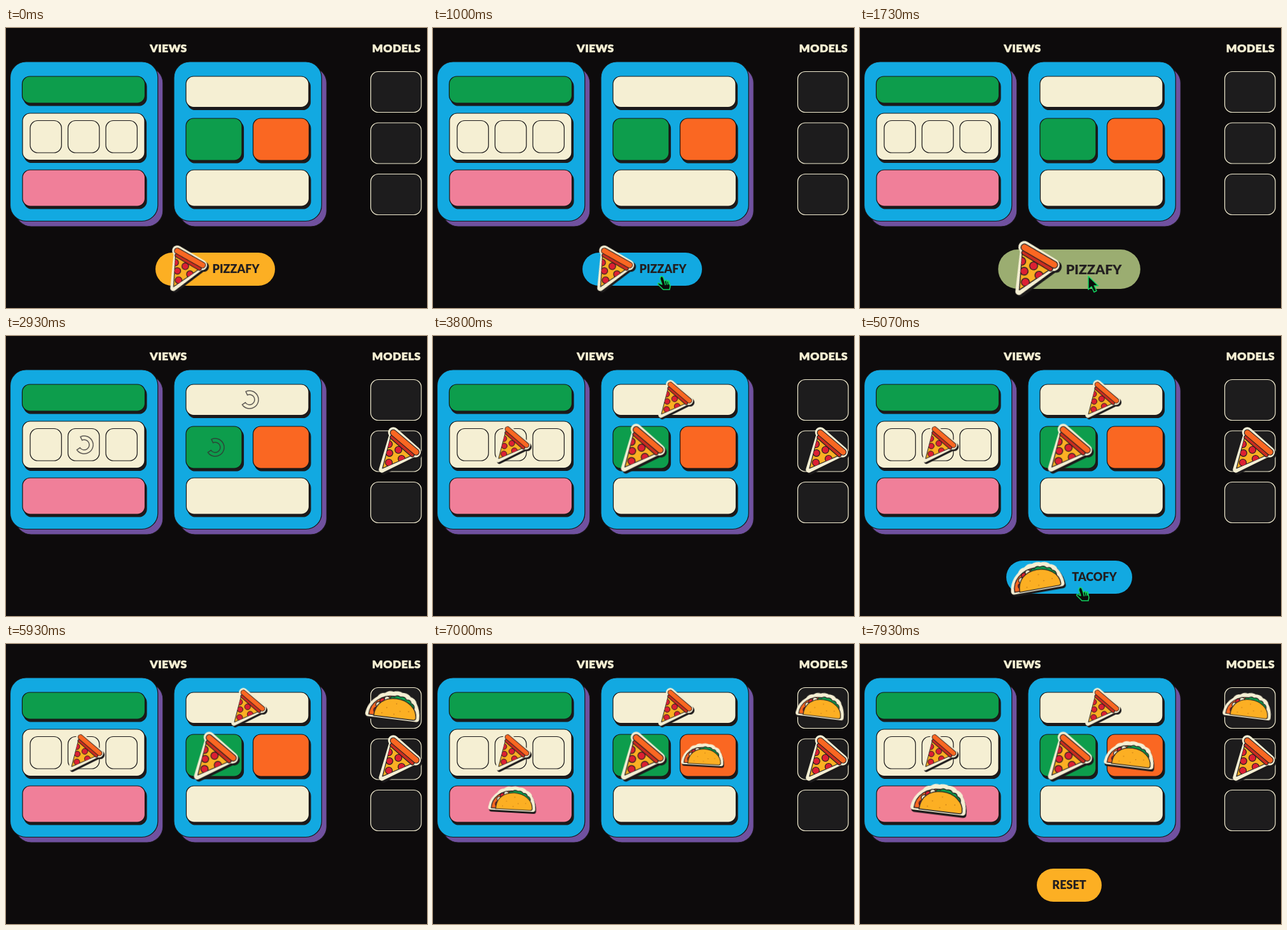
Write an HTML page that moves like this. It is 662x440 px and loops after 8000 ms.

```html
<!DOCTYPE html>
<html lang="en">
<head>
<meta charset="utf-8">
<title>Views and models</title>
<style>
  html, body { margin: 0; width: 100%; height: 100%; overflow: hidden; background: #0d0b0c; }
  svg { display: block; width: 662px; height: 440px; }
  text { font: 900 18px Lato, "Open Sans", sans-serif; text-anchor: middle; }
  .title { font-size: 17.5px; letter-spacing: .5px; fill: #f5efd3; stroke: #f5efd3; stroke-width: .7; }
  .line { fill: none; stroke-linecap: round; stroke-linejoin: round; }
  .ink { stroke: #231f20; stroke-width: 1.2; }
</style>
</head>
<body>
<svg viewBox="0 0 662 440">
  <defs>
    <clipPath id="slice"><path d="M-27 28L-14-22L20 7.5Z"/></clipPath>
    <g id="pizzaEdge">
      <path d="M-28 30L-11-27L25 4Z" stroke-width="9.5" stroke-linejoin="round"/>
      <path d="M-10-28.5L25 2.5" stroke-width="16.5" stroke-linecap="round"/>
    </g>
    <g id="pizza">
      <use href="#pizzaEdge" x="2.5" y="3" fill="#1c1a1b" stroke="#1c1a1b"/>
      <use href="#pizzaEdge" fill="#f5efd3" stroke="#f5efd3"/>
      <path class="ink" d="M-27 28L-14-22L20 7.5Z" fill="#fcaf23" stroke-linejoin="round"/>
      <g class="ink" fill="#dc2033" clip-path="url(#slice)">
        <circle cx="-17" cy="-10" r="5.5"/><circle cx="-2" cy="-1" r="5.5"/>
        <circle cx="-16" cy="4" r="5.3"/><circle cx="3" cy="13" r="5.5"/>
        <circle cx="-17" cy="19" r="5.5"/>
      </g>
      <path class="line" d="M-12-21L20 7" stroke="#231f20" stroke-width="7"/>
      <path class="line" d="M-12-21L20 7" stroke="#c92d20" stroke-width="4.8"/>
      <path class="line" d="M-10-28L26 2.5" stroke="#231f20" stroke-width="10.5"/>
      <path class="line" d="M-10-28L26 2.5" stroke="#fa6722" stroke-width="8.3"/>
    </g>

    <path id="tacoEdge" stroke-width="8" stroke-linejoin="round" d="M-34 13C-33 4-28-4-21-9Q-18-15-12-14Q-8-19-2-17Q4-20 10-17Q17-18 20-13Q27-12 28-7Q34 2 34 13Z"/>
    <g id="taco">
      <use href="#tacoEdge" x="1.5" y="3" fill="#1c1a1b" stroke="#1c1a1b"/>
      <use href="#tacoEdge" fill="#f5efd3" stroke="#f5efd3"/>
      <path class="ink" fill="#fa6722" d="M-33 14C-33-3-18-15 0-15L-15 14Z"/>
      <g class="ink">
        <circle cx="-21" cy="-1" r="3.8" fill="#f5efd3"/><circle cx="-16" cy="-7" r="3.8" fill="#dc2033"/>
        <circle cx="-10" cy="-10" r="3.8" fill="#f5efd3"/><circle cx="-23" cy="7" r="3.8" fill="#dc2033"/>
        <path fill="#0d9d4c" d="M-7-9Q-6-16 0-14Q3-18 8-15Q14-17 17-12Q23-13 24-8Q30-6 29 0L5 2Z"/>
        <path fill="#fcaf23" d="M-26 15C-26-2-14-12 3-12S33-1 33 12Q33 15 30 15Z"/>
      </g>
      <g fill="#b56a16">
        <circle cx="-9" cy="2" r=".7"/><circle cx="4" cy="-5" r=".7"/><circle cx="10" cy="5" r=".7"/>
        <circle cx="22" cy="4" r=".7"/><circle cx="-15" cy="10" r=".7"/><circle cx="2" cy="10" r=".7"/>
      </g>
    </g>
    <path id="spinner" fill="none" stroke="#333031" stroke-width="1.5" opacity=".8"
      d="M-6-12.6A14 14 0 1 1-11.5 8L-6.6 4.6A8 8 0 1 0-3.4-7.2Z"/>
  </defs>

  <rect width="662" height="440" fill="#0d0b0c"/>
  <text class="title" x="255.5" y="37.7">VIEWS</text>
  <text class="title" x="614" y="37.7">MODELS</text>
  <g id="boxes"></g>
  <g id="stage"></g>
  <g id="cursor" stroke="#12d660" stroke-width="1.5" stroke-linejoin="round" fill="#0b0b0b">
    <path id="arrow" d="M0 0V21L5 16.5L9 25L13 23L9.2 15H15.5Z"/>
    <path id="hand" d="M-1 1Q1-1 3 2L5 8L8 6L10 8L12 7L14 16L13 21H3L-5 13Q-6 10-3 11L1 13L-2 4ZM5 8L6.5 14M8 7L9.5 13.5M11 8L12 13"/>
  </g>
</svg>

<script>
const LOOP = 8000;
const SPRING = 'cubic-bezier(.34,1.56,.64,1)';
const SMOOTH = 'cubic-bezier(.45,0,.2,1)';
const CREAM = '#f5efd3', BLUE = '#12a9e1', GREEN = '#0d9d4c', ORANGE = '#fa6722',
  PINK = '#f07f99', YELLOW = '#fcaf23', INK = '#1c1a1b';
const $ = id => document.getElementById(id);

function add(parent, tag, attrs, text = '') {
  const el = document.createElementNS('http://www.w3.org/2000/svg', tag);
  for (const key in attrs) el.setAttribute(key, attrs[key]);
  el.textContent = text;
  return parent.appendChild(el);
}

// Steps are [time, value, easing to the next step].
function play(el, prop, steps) {
  const all = [[0, steps[0][1]], ...steps, [LOOP, steps.at(-1)[1]]];
  el.animate(all.map(([time, value, easing = 'linear']) =>
    ({ offset: time / LOOP, [prop]: value, easing })),
    { duration: LOOP, iterations: Infinity });
}

const pose = (x, y, scale = 1, turn = 0) =>
  `translate(${x}px, ${y}px) rotate(${turn}deg) scale(${scale})`;

function box(x, y, width, height, fill, rx = 12, stroke = '#171516') {
  add($('boxes'), 'rect', { x, y, width, height, rx, fill, stroke, 'stroke-width': 1.2 });
}

function card(x, y, width, height, fill) {
  box(x + 2.5, y + 4, width, height, INK, 12, INK);
  box(x, y, width, height, fill);
}

for (const x of [6.5, 264]) {
  box(x + 8, 61.5, 232.3, 250.5, '#70519f', 25);
  box(x, 53, 232.3, 250.5, BLUE, 25);
}
card(25.5, 76, 193, 42, GREEN);
card(26, 134, 192, 73.5, CREAM);
for (const x of [38, 97.5, 157]) box(x, 145.5, 49.3, 50.5, 'none', 12);
card(26, 223, 192.5, 57, PINK);
card(283, 76, 193, 48.5, CREAM);
card(283, 142, 88, 66, GREEN);
card(388.5, 142, 88, 66, ORANGE);
card(283.5, 223, 193, 57, CREAM);
for (const y of [68.5, 149, 229.5]) box(573.5, y, 79.5, 64, '#1d1c1d', 12, CREAM);

const sprite = name => add($('stage'), 'use', { href: '#' + name });

function spinner(x, y, from, to) {
  const group = add($('stage'), 'g', { transform: `translate(${x} ${y})` });
  const ring = add(group, 'use', { href: '#spinner' });
  play(group, 'opacity', [[from, 0], [from + 150, 1], [to, 1], [to + 120, 0]]);
  play(ring, 'transform', [[0, 'rotate(-1055deg)'], [LOOP, 'rotate(1825deg)']]);
}

function arrive(name, x, y, scale, turn, time) {
  play(sprite(name), 'transform',
    [[time, pose(x, y, 0, turn - 25), SPRING], [time + 380, pose(x, y, scale, turn)]]);
}

function button(label, width, textX, scales) {
  const group = add($('stage'), 'g', {});
  const pill = add(group, 'rect', { x: -width / 2, y: -26, width, height: 52, rx: 26, fill: YELLOW });
  add(group, 'text', { x: textX, y: 6.3, fill: '#231f20' }, label);
  play(group, 'transform', scales.map(([time, scale, easing]) => [time, pose(329, 379, scale), easing]));
  return pill;
}

const hover = (pill, enter, leave) => play(pill, 'fill',
  [[enter, YELLOW], [enter + 200, BLUE], [leave, BLUE], [leave + 240, YELLOW]]);

const leave = time => [[time, 1, 'ease-out'], [time + 200, 1.19, 'ease-in'], [time + 400, 0]];

hover(button('PIZZAFY', 188, 32.5, leave(1530)), 780, 1590);
hover(button('TACOFY', 198, 39.5, [[3820, 0, SPRING], [4170, 1], ...leave(5130)]), 4700, 5190);
button('RESET', 102, 0, [[7350, 0, SPRING], [7700, 1]]);

play(sprite('pizza'), 'transform', [
  [1530, pose(284, 375, .97, -11), 'ease-out'],
  [1730, pose(275.5, 374.5, 1.15, -10), SMOOTH],
  [2230, pose(619, 180, 1.15, 0), 'ease-in-out'],
  [2480, pose(619, 180)]]);
play(sprite('taco'), 'transform', [
  [3820, pose(329, 379, 0, -10), SPRING],
  [4170, pose(277, 381, 1.12, -10)],
  [5130, pose(277, 381, 1.12, -10), 'ease-out'],
  [5330, pose(267, 381, 1.32, -10), SMOOTH],
  [5850, pose(609, 99, 1.16, 7), 'ease-in-out'],
  [6100, pose(609.5, 99, 1, 7)]]);

spinner(123, 171, 2450, 3280);
spinner(383, 100, 2450, 3280);
spinner(329, 175, 2450, 3280);
spinner(432, 175, 6080, 6880);
spinner(122, 251, 6080, 6880);
arrive('pizza', 125.5, 169.5, .83, 0, 3300);
arrive('pizza', 381.5, 99.5, .83, 0, 3300);
arrive('pizza', 330, 176.5, 1.05, 0, 3300);
arrive('taco', 424, 175.5, 1.03, 7, 6900);
arrive('taco', 124.5, 245.5, 1.15, 7, 6900);

play($('cursor'), 'transform', [
  [300, pose(410, 452), SMOOTH], [850, pose(359, 390)], [1800, pose(359, 390), SMOOTH],
  [2200, pose(400, 452), 'step-end'], [4200, pose(410, 452), SMOOTH],
  [4850, pose(346, 395)], [5400, pose(346, 395), SMOOTH], [5800, pose(400, 452)]]);
const swap = on => [[0, 1 - on], [780, on], [1580, 1 - on], [4700, on], [5180, 1 - on]]
  .map(([time, value]) => [time, value, 'step-end']);
play($('hand'), 'opacity', swap(1));
play($('arrow'), 'opacity', swap(0));
</script>
</body>
</html>
```
